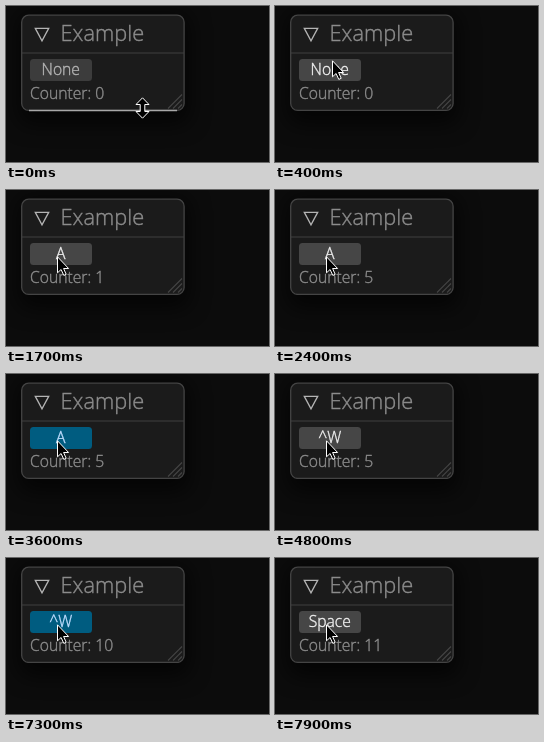
Animation, 263 px wide and 156 px high, one loop 8000 ms. Source, as an HTML page:

```html
<!DOCTYPE html>
<html lang="en">
<head>
<meta charset="utf-8">
<style>
  html, body { margin: 0; width: 100%; height: 100%; overflow: hidden; background: #0c0c0c; }
  svg { display: block; width: 263px; height: 156px; }
  text { font: 300 15.7px "Open Sans", "Noto Sans", sans-serif; color: #8c8c8c; fill: currentColor; stroke: currentColor; stroke-width: .4; }
  #title { font-size: 21.8px; }
  #label { text-anchor: middle; }
  .cursor { fill: #000; stroke: #fff; stroke-linejoin: round; }
</style>
</head>
<body>
<svg viewBox="0 0 263 156">
  <defs>
    <filter id="blur" x="-30%" y="-40%" width="160%" height="180%">
      <feGaussianBlur stdDeviation="11"/>
    </filter>
  </defs>
  <rect width="263" height="156" fill="#0c0c0c"/>
  <rect x="13" y="8" width="170" height="110" rx="8" fill="#000" opacity=".65" filter="url(#blur)"/>
  <rect x="15.7" y="9.2" width="162.4" height="95.2" rx="7" fill="#1b1b1b" stroke="#444" stroke-width="1.3"/>
  <path d="M16 47H178" stroke="#404040" stroke-width="1.2"/>
  <path d="M29.3 22.4H42.7L36 34.8Z" fill="none" stroke="#b4b4b4" stroke-width="1.3"/>
  <text id="title" x="54.6" y="35">Example</text>
  <path d="M162 102.5L176 88.5M167 102.5L176 93.5M172 102.5L176 98.5" stroke="#444" stroke-width="1.1"/>
  <path id="edge" d="M23 104.4H171" stroke="#a8a8a8" stroke-width="1.5"/>
  <rect id="button" x="24" y="53" width="62" height="22" rx="3.5"/>
  <text id="label" x="54.8" y="69"></text>
  <text id="counter" x="24" y="93"></text>
  <path id="resize" class="cursor" d="M136.5 91.8L143 98.5H138.8V105.5H143L136.5 112.2L130 105.5H134.2V98.5H130Z"/>
  <path id="arrow" class="cursor" d="M.5 .8V16.8L4.1 13.5L6.8 19.4L9.2 18.3L6.6 12.5H11.6Z"/>
</svg>
<script>
const DURATION = 8000;
const $ = id => document.getElementById(id);

const looks = {
  idle:    ["#3c3c3c", "#b4b4b4"],
  hover:   ["#464646", "#f0f0f0"],
  pressed: ["#373737", "#ffffff"],
  waiting: ["#005c80", "#c0deff"]
};

// [start time, button look, bound key]
const buttonStates = [
  [0, "idle", "None"], [400, "hover", "None"],
  [800, "pressed", "None"], [900, "waiting", "None"], [1300, "hover", "A"],
  [3500, "pressed", "A"], [3600, "waiting", "A"], [4800, "hover", "^W"],
  [7100, "pressed", "^W"], [7300, "waiting", "^W"], [7700, "hover", "Space"]
];
const countTimes = [1700, 1900, 2100, 2200, 2400, 5700, 5900, 6100, 6200, 6400, 7900];

// [start time, x, y] of the pointer tip
const pointerStops = [[100, 124, 78], [200, 101, 51], [300, 77, 38], [400, 57, 54], [500, 51, 66]];

const current = (steps, t) => steps.filter(([start]) => start <= t).pop();

function render(t) {
  const [, look, key] = current(buttonStates, t);
  const [fill, ink] = looks[look];
  $("button").style.fill = fill;
  $("label").style.color = ink;
  $("label").textContent = key;
  $("counter").textContent = "Counter: " + countTimes.filter(time => time <= t).length;

  const stop = current(pointerStops, t);
  $("edge").style.display = $("resize").style.display = stop ? "none" : "";
  $("arrow").style.display = stop ? "" : "none";
  if (stop) $("arrow").setAttribute("transform", `translate(${stop[1]} ${stop[2]})`);
}

const origin = performance.now();
function tick() {
  render((performance.now() - origin) % DURATION);
  requestAnimationFrame(tick);
}
tick();
</script>
</body>
</html>
```
